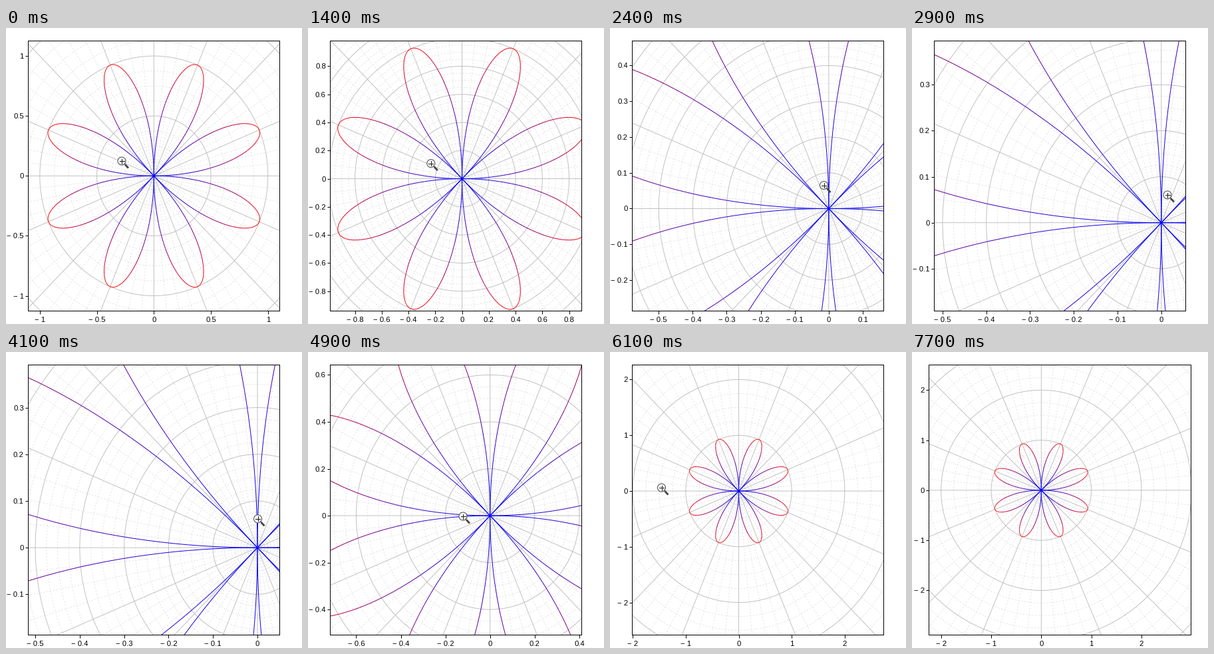
A matplotlib script for the animation above (7.9 s loop, 445 by 445 pixels).

```python
import numpy as np
import matplotlib.pyplot as plt
from matplotlib.animation import FuncAnimation
from matplotlib.collections import LineCollection
from matplotlib.patches import Circle

SIZE, DPI = 445, 100
PT = 72 / DPI                      # points per pixel
FRAMES, INTERVAL = 79, 100

TOP, BOTTOM = 19.3, 425.3
NARROW, WIDE = (33.3, 411.3), (25.3, 419.3)
RELAYOUT = 6300                    # ms, the box widens for shorter labels
HALF_X, HALF_Y = 1.102, 1.126      # half ranges at zoom 1
ANCHOR_X, ANCHOR_Y = -0.3136, 0.1377   # data point that zooming keeps in place
WIDE_ANCHOR = 0.369                # its place across the wide box

ZOOM_RATE = 0.0134                 # zoom per pixel of drag
LAG = 35                           # ms the plot trails the pointer
DRAG_START, DRAG_END = 1250, 6700

# Pointer way points: ms, x, y
TIMES, XS, YS = np.transpose([
    (550, 174, 200), (1000, 168, 197.5),        # small nudge
    (DRAG_START, 168, 197.5), (1900, 241, 224), # drag right to zoom in
    (2400, 321.5, 236.5), (2900, 384, 251),
    (4070, 384, 251), (4900, 233, 247),         # drag left to zoom out
    (6100, 77.5, 204), (6300, 64, 202),
    (7200, 64, 202), (7700, 74, -30),           # leave over the top
])

plt.rcParams["font.family"] = "Liberation Sans"
fig = plt.figure(figsize=(SIZE / DPI, SIZE / DPI), dpi=DPI, facecolor="white")
ax = fig.add_axes([0.1, 0.1, 0.8, 0.8])
ax.tick_params(length=4.5 * PT, width=PT, labelsize=11.3 * PT)
ax.tick_params(axis="x", pad=4 * PT)
ax.tick_params(axis="y", pad=2 * PT)
for spine in ax.spines.values():
    spine.set_linewidth(PT)

# Rose r = sin(4 theta), blue at the centre and red at the tips
theta = np.linspace(0, 2 * np.pi, 801)
unit = np.column_stack([np.cos(theta), np.sin(theta)])
rose = unit * np.sin(4 * theta)[:, None]
middle = (theta[:-1] + theta[1:]) / 2
red = np.abs(np.sin(4 * middle)) ** 1.3
rose_line = LineCollection(
    np.stack([rose[:-1], rose[1:]], axis=1), linewidths=PT, zorder=2.2,
    colors=np.column_stack([red, 0 * red, 1 - red]), capstyle="butt")
minor = LineCollection([], colors="#e0e0e0", linewidths=0.8 * PT,
                       linestyles=(0, (3, 3)), zorder=1)
major = LineCollection([], colors="#bcbcbc", linewidths=0.9 * PT, zorder=1.5)
for lines in (minor, major, rose_line):
    lines.set_snap(False)
    ax.add_collection(lines, autolim=False)

# Pointer layer in pixels, y down
layer = fig.add_axes([0, 0, 1, 1])
layer.set(xlim=(0, SIZE), ylim=(SIZE, 0))
layer.axis("off")


def stroke(color, width):
    return layer.plot([], [], color=color, lw=width * PT, zorder=3)[0]


neck, handle = stroke("#555555", 1.3), stroke("#444444", 2.8)
lens = layer.add_patch(Circle((0, 0), 6, fc="white", ec="#555555",
                              lw=1.1 * PT, zorder=2.5))
plus_h, plus_v = stroke("#222222", 1.1), stroke("#222222", 1.1)


def tick_step(span):
    """Round a sixth of the span to 1, 2 or 5 times a power of ten."""
    raw = span / 6
    options = 10.0 ** np.floor(np.log10(raw)) * np.array([1, 2, 5, 10])
    return options[np.argmin(np.abs(np.log(options / raw)))]


def ticks(low, high, step):
    return np.arange(np.ceil(low / step), np.floor(high / step) + 1) * step


def label(value):
    value = round(value, 6)
    return ("\u2212 " if value < 0 else "") + f"{abs(value):g}"


def set_grid(step, reach):
    """Every fourth circle and ray is a solid one."""
    solid, dashed = [], []
    for k in range(1, int(np.ceil(4 * reach / step)) + 1):
        (dashed if k % 4 else solid).append(unit[::8] * step * k / 4)
    for k in range(64):
        a = k * np.pi / 32
        tip = (reach * np.cos(a), reach * np.sin(a))
        (dashed if k % 4 else solid).append(np.array([(0, 0), tip]))
    major.set_segments(solid)
    minor.set_segments(dashed)


def set_view(zoom, wide):
    left, right = WIDE if wide else NARROW
    ax.set_position([left / SIZE, 1 - BOTTOM / SIZE,
                     (right - left) / SIZE, (BOTTOM - TOP) / SIZE])
    ylim = [ANCHOR_Y + (s * HALF_Y - ANCHOR_Y) / zoom for s in (-1, 1)]
    xlim = [ANCHOR_X + (s * HALF_X - ANCHOR_X) / zoom for s in (-1, 1)]
    if wide:                       # equal scales on both axes
        span = 2 * HALF_Y / zoom * (right - left) / (BOTTOM - TOP)
        start = ANCHOR_X - WIDE_ANCHOR * span
        xlim = [start, start + span]

    step = tick_step(xlim[1] - xlim[0])
    xt, yt = ticks(*xlim, step), ticks(*ylim, step)
    ax.set_xticks(xt, [label(v) for v in xt])
    ax.set_yticks(yt, [label(v) for v in yt])
    ax.set(xlim=xlim, ylim=ylim)
    set_grid(step, np.hypot(np.abs(xlim).max(), np.abs(ylim).max()))


def set_pointer(x, y):
    lens.center = (x, y)
    plus_h.set_data([x - 3.5, x + 3.5], [y, y])
    plus_v.set_data([x, x], [y - 3.5, y + 3.5])
    neck.set_data([x + 4, x + 6.5], [y + 4, y + 6.5])
    handle.set_data([x + 6, x + 9], [y + 6.3, y + 9.5])


def zoom_at(time):
    held = np.clip(time - LAG, DRAG_START, DRAG_END)
    drag = np.interp(held, TIMES, XS) - np.interp(DRAG_START, TIMES, XS)
    factor = 1 + ZOOM_RATE * abs(drag)
    return factor if drag >= 0 else 1 / factor


def draw(frame):
    time = frame * INTERVAL
    set_view(zoom_at(time), time >= RELAYOUT)
    set_pointer(np.interp(time, TIMES, XS), np.interp(time, TIMES, YS))
    return []


anim = FuncAnimation(fig, draw, frames=FRAMES, interval=INTERVAL,
                     init_func=lambda: draw(0), repeat=True, repeat_delay=0)
plt.show()
```
